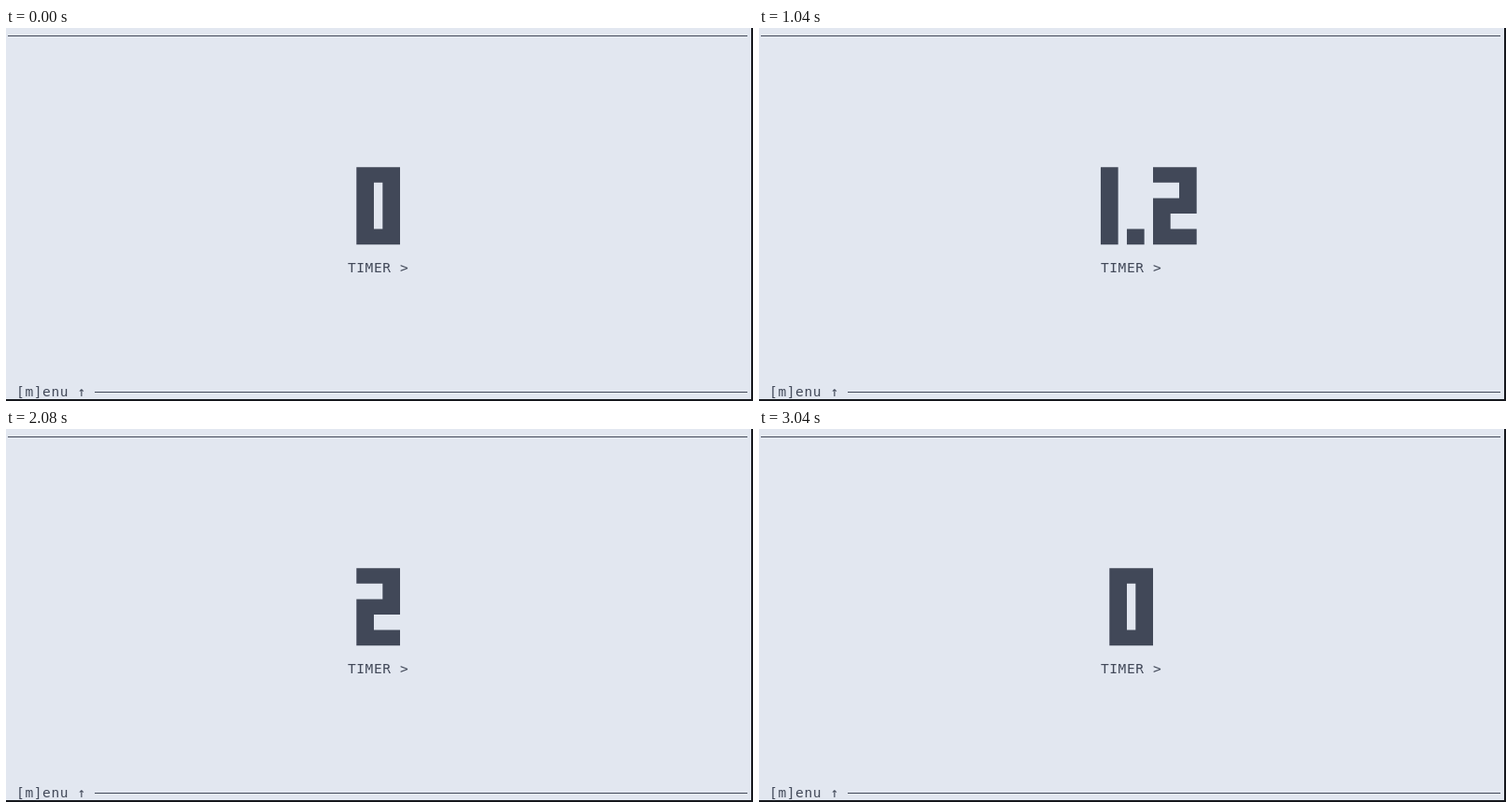
Animation of 800 by 400 pixels, one loop 3.16 s. Source, as an HTML page:

```html
<!DOCTYPE html>
<html lang="en">
<head>
<meta charset="utf-8">
<title>Timer</title>
<style>
  html, body { margin: 0; width: 100%; height: 100%; overflow: hidden; background: #e2e7f0; }
  svg { display: block; width: 800px; height: 400px; }
  text {
    font: 14.5px "DejaVu Sans Mono", "Liberation Mono", monospace;
    letter-spacing: 0.61px;
    white-space: pre;
  }
</style>
</head>
<body>
<svg viewBox="0 0 800 400" fill="#414858">
  <rect width="800" height="400" fill="#e2e7f0"/>
  <rect x="2" y="8" width="792" height="1" shape-rendering="crispEdges"/>
  <rect x="95" y="390" width="699" height="1" shape-rendering="crispEdges"/>
  <path id="digits"/>
  <text x="365.9" y="262">TIMER &gt;</text>
  <text x="11.1" y="395">[m]enu ↑</text>
  <path d="M798 0h2v400H0v-2h798z" fill="#15171c"/>
</svg>
<script>
const LOOP = 3160;
const CELL = { w: 9.34, h: 16.575, x: 1.7, y: 0.1 };
const TOP_ROW = 9;

// Row codes: F full, L left, R right, S both sides, D dot
const GLYPHS = {
  0: 'FSSSF', 1: 'RRRRR', 2: 'FRFLF', 3: 'FRFRF', 4: 'SSFRR',
  5: 'FLFRF', 6: 'FLFSF', 7: 'FRRRR', 8: 'FSFSF', 9: 'FSFRF',
  '.': '    D'
};
const RUNS = {
  F: [[0, 5]], L: [[0, 2]], R: [[3, 2]], S: [[0, 2], [3, 2]], D: [[0, 2]], ' ': []
};

// Tenths are shown while running; only whole seconds in the pauses
const STEPS = [
  [0, '0'],
  [120, '0.3'], [160, '0.4'], [280, '0.5'], [360, '0.6'], [480, '0.7'], [520, '0'],
  [760, '1'], [880, '1.1'], [960, '1.2'], [1080, '1.3'], [1160, '1.4'], [1240, '1.5'], [1280, '1'],
  [1680, '1.9'], [1720, '2'], [1840, '2.1'], [1920, '2.2'], [2040, '2.3'], [2080, '2'],
  [2480, '2.7'], [2520, '2.8'], [2600, '2.9'], [2720, '3'], [2800, '3.1'], [2920, '3.2'], [3000, '3.3'],
  [3040, '0']
];

const digits = document.getElementById('digits');

function block(col, row, cols) {
  const x = CELL.x + col * CELL.w, y = CELL.y + row * CELL.h, w = cols * CELL.w;
  return `M${x} ${y}h${w}v${CELL.h}h${-w}z`;
}

function outline(label) {
  let col = label.length > 1 ? 36 : 40, d = '';
  for (const ch of label) {
    [...GLYPHS[ch]].forEach((code, i) => {
      for (const [start, cols] of RUNS[code]) d += block(col + start, TOP_ROW + i, cols);
    });
    col += ch === '.' ? 3 : 6;
  }
  return d;
}

function labelAt(t) {
  let label = '';
  for (const [at, text] of STEPS) if (t >= at) label = text;
  return label;
}

const begin = performance.now();
let shown = '';

function draw() {
  const label = labelAt((performance.now() - begin) % LOOP);
  if (label !== shown) digits.setAttribute('d', outline(shown = label));
  requestAnimationFrame(draw);
}
draw();
</script>
</body>
</html>
```
